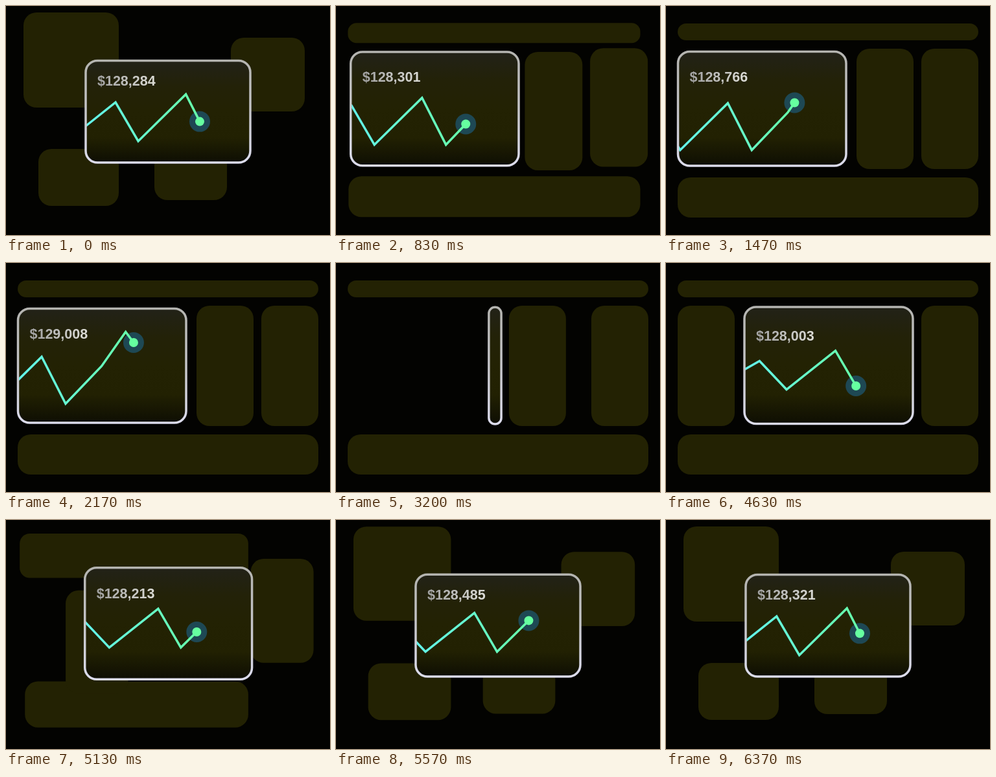
An HTML page with a canvas that plays this animation: 500 px wide and 354 px high, repeating every 6400 ms.

```html
<!DOCTYPE html>
<html lang="en">
<head>
<meta charset="utf-8">
<title>Shifting layout with live chart</title>
<style>
  html, body { margin: 0; width: 100%; height: 100%; overflow: hidden; background: #030301; }
  canvas { display: block; }
</style>
</head>
<body>
<canvas id="stage" width="500" height="354"></canvas>
<script>
const ctx = document.getElementById('stage').getContext('2d');
const LOOP = 6400;
const SPEED = 0.0555; // chart scroll in px per ms
const MOVE = 1060;    // time to change layout
const RETURN = 4660;
const CLOSED = 3300;  // the card is narrow and its chart hidden

const clamp = x => Math.max(0, Math.min(1, x));
const ease = x => x < 0.5 ? 4 * x ** 3 : 1 - 4 * (1 - x) ** 3;
const mix = (a, b, p) => a + (b - a) * p;

// Pose after a series of eased moves: [start, duration, pose]
function pose(first, moves, t) {
  return moves.reduce((now, [start, dur, next]) => {
    const p = ease(clamp((t - start) / dur));
    return now.map((v, i) => mix(v, next[i], p));
  }, first);
}

// Out to the grid and back to the scattered layout
const trip = (home, grid, ...extra) => [home, [[0, MOVE, grid], ...extra, [RETURN, MOVE, home]]];

// Tiles: x, y, width, height, radius
const tiles = [
  trip([27, 10, 147, 147, 20], [18, 27, 464, 26, 13]),
  trip([347, 49, 114, 114, 20], [394, 66, 88, 186, 20]),
  trip([50, 221, 124, 88, 20], [18, 265, 464, 62, 20]),
  trip([229, 188, 112, 112, 20], [294, 66, 88, 186, 20], [2800, 1380, [18, 66, 88, 186, 20]])
];

// Card: x, y, width, height, text baseline
const card = trip([123, 84.5, 254, 157.5, 123], [18.5, 70.5, 259.5, 176.5, 117],
  [2700, 550, [236.5, 68.3, 18.5, 180.7, 120]],
  [3350, 850, [121, 68, 260, 180.5, 120]]);

// Turning points of the chart over one loop: [time, level]
const turns = surge => [
  [280, 0], [1280, surge ? 58 : 23], [1950, surge ? 111 : 44],
  [2700, surge ? 55 : 0], [4060, 60], [4690, 0], [6015, 72.5]
];

// Turning points already passed, ending with the current level
function chartPoints(t) {
  const all = [
    ...turns(false).map(([k, v]) => [k - LOOP, v]),
    ...turns(t < CLOSED),
    [LOOP + 280, 0]
  ];
  const next = all.findIndex(([k]) => k > t);
  const [t0, a] = all[next - 1], [t1, b] = all[next];
  return [...all.slice(0, next), [t, mix(a, b, (t - t0) / (t1 - t0))]];
}

function roundRect(x, y, w, h, r) {
  ctx.beginPath();
  ctx.roundRect(x, y, w, h, Math.min(r, w / 2, h / 2));
}

function gradient(x0, y0, x1, y1, ...colors) {
  const g = ctx.createLinearGradient(x0, y0, x1, y1);
  colors.forEach((c, i) => g.addColorStop(i / (colors.length - 1), c));
  return g;
}

function disc(x, y, r, color) {
  ctx.fillStyle = color;
  ctx.beginPath();
  ctx.arc(x, y, r, 0, 7);
  ctx.fill();
}

function drawChart(t, left, points) {
  const drift = Math.sin(2 * Math.PI * t / LOOP) ** 3;
  const dotX = left + 176 + 4 * drift;
  const base = 209 + 14 * drift;
  const dotY = base - points.at(-1)[1];

  disc(dotX, dotY, 16, '#1e4854');
  ctx.beginPath();
  for (const [k, level] of points) ctx.lineTo(dotX - (t - k) * SPEED, base - level);
  ctx.lineWidth = 3.5;
  ctx.strokeStyle = gradient(left, 0, dotX, 0, '#62f2ea', '#66f8cc', '#66ffa8');
  ctx.stroke();
  disc(dotX, dotY, 7, '#66ffa0');
}

function drawCard(t) {
  const [x, y, w, h, textY] = pose(...card, t);
  const points = chartPoints(t);
  const amount = 127940 + Math.round(11.3 * points.at(-1)[1]);

  roundRect(x, y, w, h, 18);
  ctx.fillStyle = gradient(0, y, 0, y + h, '#222218', '#232208', '#232203', '#222102', '#0e0e03');
  ctx.fill();

  ctx.save();
  ctx.clip();
  ctx.globalAlpha = clamp((w - 40) / 100);
  drawChart(t, x, points);
  ctx.font = 'bold 21.5px "Liberation Sans", Arial, sans-serif';
  ctx.fillStyle = gradient(x + 18, 0, x + 108, 0, '#a0a0a0', '#c0c0be', '#dcdcd6');
  ctx.fillText('$' + amount.toLocaleString('en-US'), x + 18, textY);
  ctx.restore();

  roundRect(x, y, w, h, 18);
  ctx.lineWidth = 3.5;
  ctx.strokeStyle = gradient(0, y, 0, y + h, '#b4b4b0', '#c4c4c8', '#dcdcec');
  ctx.stroke();
}

function draw(t) {
  ctx.fillStyle = '#030301';
  ctx.fillRect(0, 0, 500, 354);
  for (const tile of tiles) {
    roundRect(...pose(...tile, t));
    ctx.fillStyle = '#232203';
    ctx.fill();
  }
  drawCard(t);
}

const start = performance.now();
function tick() {
  draw((performance.now() - start) % LOOP);
  requestAnimationFrame(tick);
}
tick();
</script>
</body>
</html>
```
